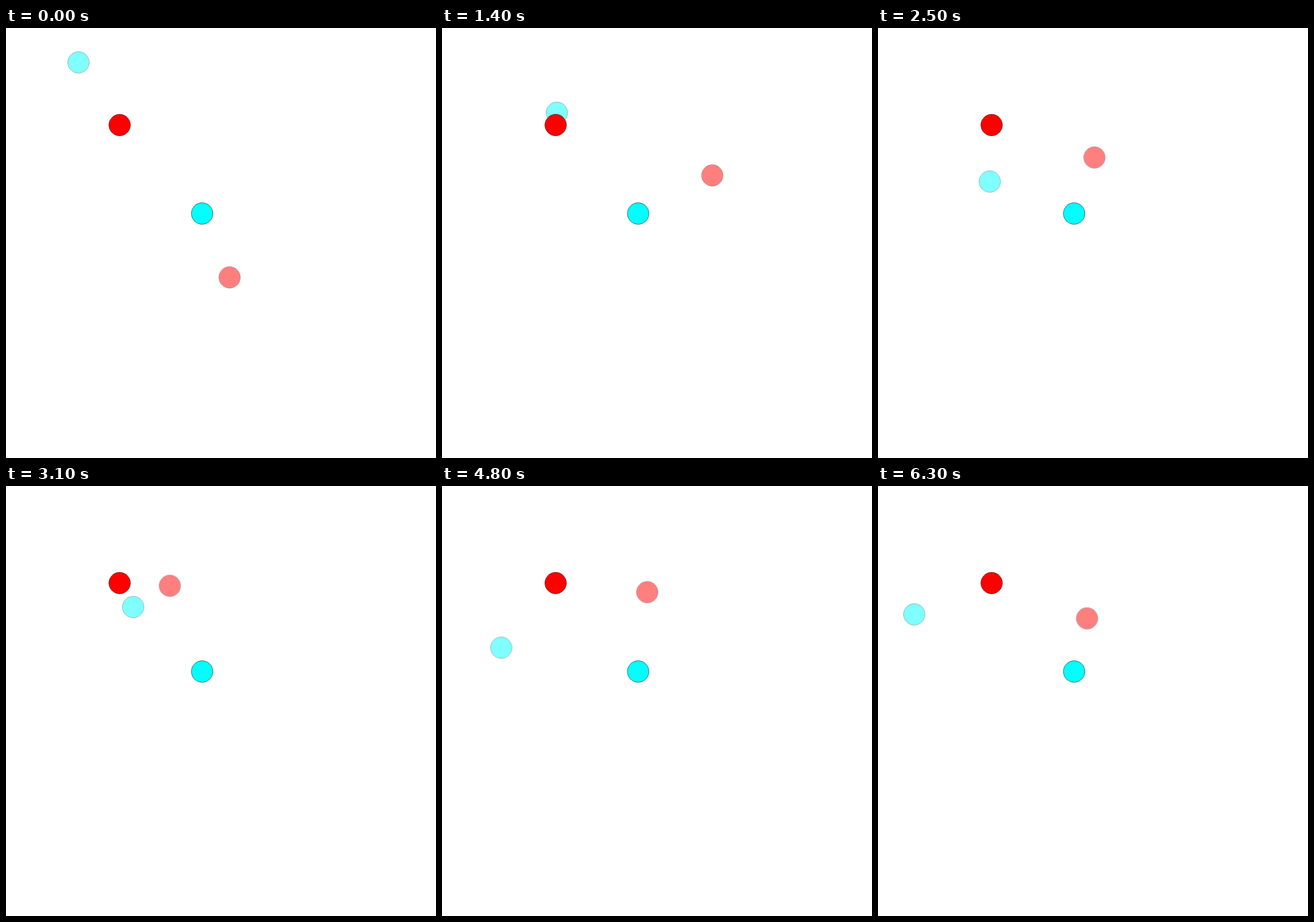
These frames come from a looping animation (700x700 px, 6.4 s). An HTML page:

```html
<!DOCTYPE html>
<html lang="en">
<head>
<meta charset="utf-8">
<title>Wandering dots</title>
<style>
  html, body { margin: 0; width: 100%; height: 100%; overflow: hidden; background: #fff; }
  svg { display: block; width: 700px; height: 700px; }
  circle { r: 17.5px; stroke: #000; stroke-opacity: .55; stroke-width: 1px; }
  .red { fill: #f00; }
  .cyan { fill: #0ff; }
  .walker { opacity: .5; }
</style>
</head>
<body>
<svg viewBox="0 0 700 700">
  <circle id="redWalker" class="red walker"/>
  <circle id="cyanWalker" class="cyan walker"/>
  <circle class="red" cx="185" cy="158"/>
  <circle class="cyan" cx="319.3" cy="302"/>
</svg>
<script>
  const TICKS = 64, TICK_MS = 100;

  // Each walker drifts through a few key points: [tick, x, y]
  const walkers = {
    cyanWalker: [[0, 118, 56], [7, 200, 126.5], [14, 187, 138], [20, 161, 294],
      [31, 207, 197], [41, 121, 160], [49, 93, 278], [55, 90.7, 227], [63, 59, 209]],
    redWalker: [[0, 364, 406], [7, 508.7, 259], [14, 440, 240], [20, 423.7, 251],
      [31, 266.7, 162.5], [41, 313.8, 192.5], [49, 337, 170], [55, 291.8, 143], [63, 340.3, 215.5]]
  };

  const mix = (a, b, k) => a + (b - a) * k;

  function position(points, tick) {
    const next = Math.max(1, points.findIndex(([t]) => t >= tick));
    const [t0, x0, y0] = points[next - 1], [t1, x1, y1] = points[next];
    const k = (tick - t0) / (t1 - t0);
    return [mix(x0, x1, k), mix(y0, y1, k)];
  }

  // The picture changes once per tick and holds in between
  for (const [id, points] of Object.entries(walkers)) {
    const frames = Array.from({ length: TICKS + 1 }, (_, i) => {
      const [x, y] = position(points, Math.min(i, TICKS - 1));
      return { offset: i / TICKS, easing: 'steps(1, end)', transform: `translate(${x}px, ${y}px)` };
    });
    document.getElementById(id).animate(frames, { duration: TICKS * TICK_MS, iterations: Infinity });
  }
</script>
</body>
</html>
```
